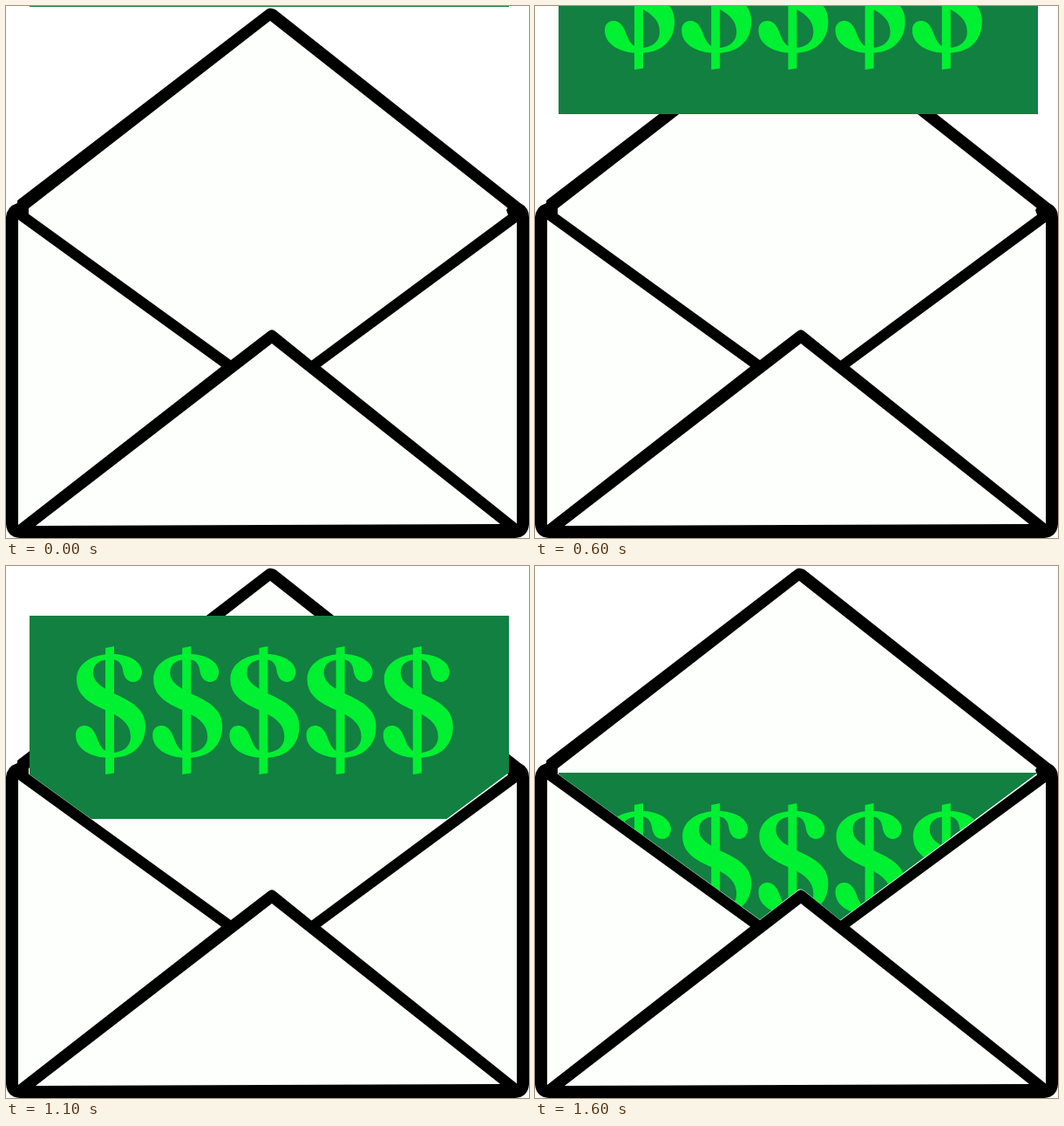
Animation, 600 px wide and 610 px high, one loop 1.9 s. Source, as an HTML page with a canvas:

```html
<!DOCTYPE html>
<html lang="en">
<head>
<meta charset="utf-8">
<title>Money into an envelope</title>
<style>
  html, body { margin: 0; width: 100%; height: 100%; overflow: hidden; background: #fff; }
  canvas { display: block; }
</style>
</head>
<body>
<canvas id="stage" width="600" height="610"></canvas>
<script>
const ctx = document.getElementById('stage').getContext('2d');
const LOOP = 1900, STEP = 100, LAST_STEP = 16;
const PAPER = '#fdfffc';
const CARD = { x: 27, width: 550, height: 233, color: '#128040' };

// Lower edge of the card every 200 ms.
const edgeKeys = [1, 35, 73, 124, 179, 249, 333, 415, 470];

const outline = new Path2D(
  'M0 242Q1 230 13 226V223L299 4Q302 1 309 4L590 226Q600 231 600 242' +
  'V594Q599 609 584 610H16Q1 609 0 594Z');

const openings = new Path2D(
  'M303 17L575.5 231.5L574 234L576 239.5L350.5 406.5L309 373Q305 369.5 301 373' +
  'L258 406L26 238.5V232Z' +
  'M14 245L247 413.5L14 595Z' +
  'M586 248L361 413.5L586 593.5Z' +
  'M305 387L567 594L34 596Z');

// The card shows only where the front of the envelope does not cover it.
const pocket = new Path2D(
  'M27 0H577V237L574 239L350 406L309 372.5Q305 369 301 372L258 405.5L27 239Z');

const dollar = new Path2D(
  'M76 29C75 17 61 9 41 9C17 9 1 21 1 38C1 57 17 66 34 73C54 82 63 90 63 104' +
  'C63 115 54 122 41 122C31 121 28 114 25 107C22 98 18 91 10 91' +
  'C4 91 0 95 0 102C0 117 16 128 40 128C65 128 80 114 80 92' +
  'C80 73 66 65 50 57C29 47 20 41 20 30C20 20 28 15 41 15C49 15 53 20 54 27' +
  'C55 36 60 41 66 41C72 41 76 36 76 29Z');
const stem = new Path2D('M34 2L44 0V145.5L34 147Z');

function cardEdge(step) {
  const i = Math.min(Math.floor(step / 2), edgeKeys.length - 2);
  const u = step / 2 - i;
  const a = edgeKeys[i], b = edgeKeys[i + 1];
  const before = edgeKeys[i - 1] ?? 2 * a - b;
  const after = edgeKeys[i + 2] ?? 2 * b - a;
  const curve = a + u * (b - before + u * (2 * before - 5 * a + 4 * b - after +
    u * (3 * (a - b) + after - before))) / 2;
  return Math.round(curve);
}

function drawEnvelope() {
  ctx.fillStyle = '#fff';
  ctx.fillRect(0, 0, 600, 610);
  ctx.fillStyle = '#000';
  ctx.fill(outline);
  ctx.fillStyle = PAPER;
  ctx.fill(openings);
}

function drawCard(top) {
  ctx.save();
  ctx.clip(pocket);
  ctx.fillStyle = CARD.color;
  ctx.fillRect(CARD.x, top, CARD.width, CARD.height);
  ctx.fillStyle = '#00f032';
  for (let i = 0; i < 5; i++) {
    ctx.save();
    ctx.translate(80 + i * 88.2, top + 35);
    ctx.fill(dollar);
    ctx.fill(stem);
    ctx.restore();
  }
  ctx.restore();
}

function render(now) {
  const step = Math.min(Math.floor((now % LOOP) / STEP), LAST_STEP);
  drawEnvelope();
  drawCard(cardEdge(step) - CARD.height);
}

const start = performance.now();
function tick() {
  render(performance.now() - start);
  requestAnimationFrame(tick);
}
tick();
</script>
</body>
</html>
```
